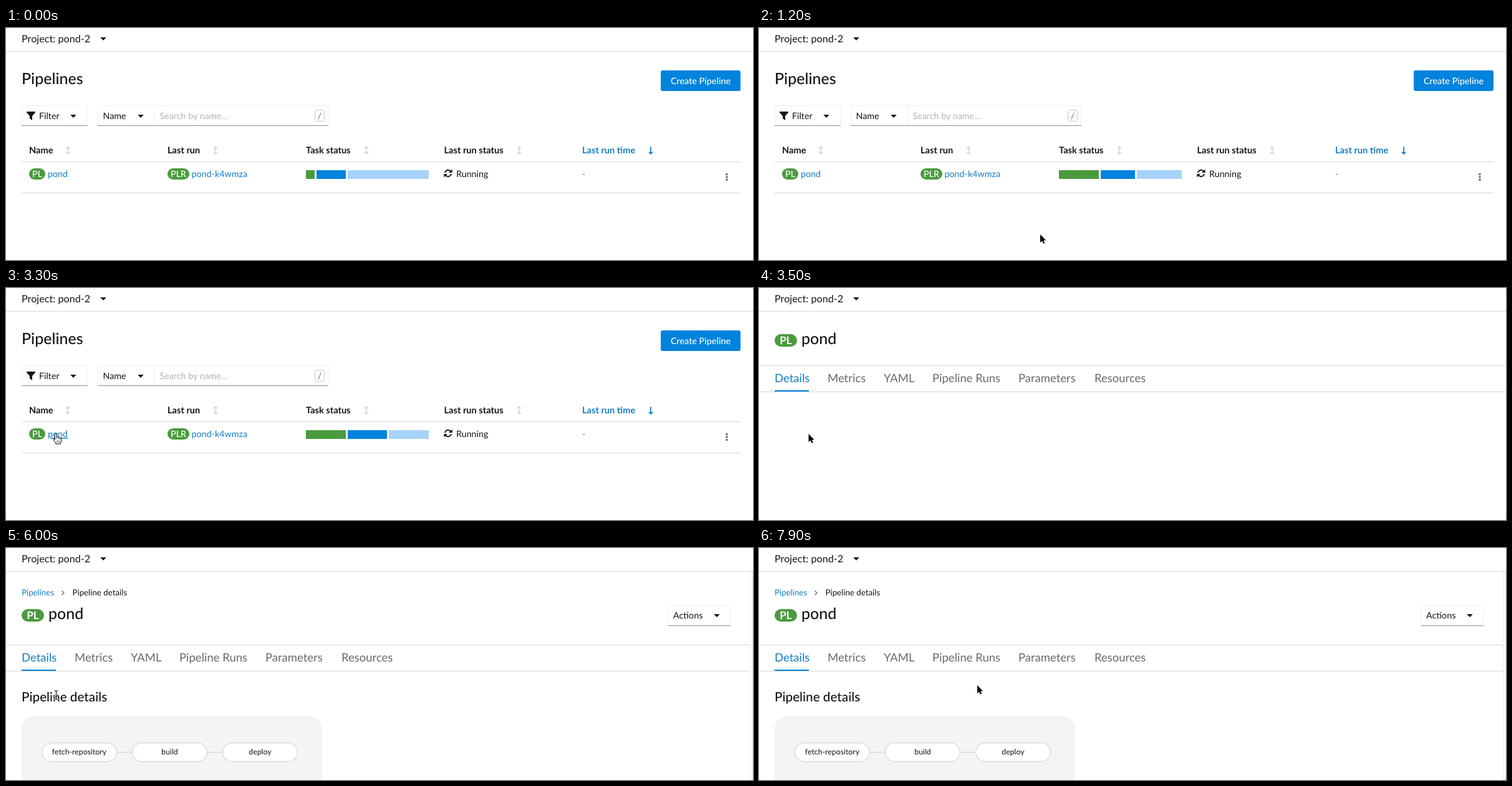
These frames come from a looping animation (1198x372 px, 8 s). An HTML page with a canvas:

```html
<!DOCTYPE html>
<html lang="en">
<head>
<meta charset="utf-8">
<title>Pipelines</title>
<style>
  html, body { margin: 0; width: 100%; height: 100%; overflow: hidden; background: #fff; }
  canvas, svg { position: absolute; left: 0; top: 0; width: 1198px; height: 372px; }
  text { font-family: Lato, "Open Sans", sans-serif; text-rendering: geometricPrecision; white-space: pre; }
</style>
</head>
<body>
<canvas id="shapes" width="1198" height="372"></canvas>
<svg id="overlay" viewBox="0 0 1198 372">
  <g id="labels"></g>
  <g id="cursor" stroke-linejoin="round" stroke-linecap="round">
    <path id="arrow" d="M0 0V13L3 10.2L5 14.8L7.2 13.8L5.2 9.4H9.2Z" fill="#000" stroke="#fff" stroke-width="1.2" paint-order="stroke"/>
    <g id="hand" fill="#fff" stroke="#000" stroke-width="1">
      <path d="M-1.5 1Q-1.5-.5 0-.5Q1.5-.5 1.5 1V5Q4 4.2 4.5 5.6Q6.5 5 7 6.6Q9 6.3 9 8V11Q9 13 7.5 14.5V16H0V14.5L-3.5 10Q-4.5 8-3 7.5Q-2 7.5-1.5 9Z"/>
      <path d="M1.5 5V7.5M4.5 6V8M7 7V8.5M2 11V13.5M4 11V13.5M6 11V13.5" fill="none" stroke-width=".7"/>
    </g>
    <g id="beam" fill="none">
      <path class="stem" stroke="#fff" stroke-width="2.6"/>
      <path class="stem" stroke="#111" stroke-width="1.1"/>
    </g>
  </g>
</svg>
<script>
const LOOP = 8000, STEP = 100;
const INK = '#151515', GREY = '#6a6a6a', LINK = '#147dc2', GREEN = '#4a9b3e',
      BLUE = '#0083dd', PALE = '#a6d3fa', RULE = '#d7d7d7';
const byId = id => document.getElementById(id);
const ctx = byId('shapes').getContext('2d');

// ---------- text ----------
function group(parent = byId('labels')) {
  return parent.appendChild(document.createElementNS('http://www.w3.org/2000/svg', 'g'));
}
function label(parent, str, x, y, size = 14.3, color = INK, weight = 400, anchor = 'start') {
  const el = document.createElementNS('http://www.w3.org/2000/svg', 'text');
  const attrs = { x, y, fill: color, 'font-size': size, 'font-weight': weight, 'text-anchor': anchor };
  for (const key in attrs) el.setAttribute(key, attrs[key]);
  el.textContent = str;
  return parent.appendChild(el);
}

label(group(), 'Project: pond-2', 25, 23, 16.2);

const listText = group();
label(listText, 'Pipelines', 25, 90, 25, INK, 500);
label(listText, 'Create Pipeline', 1114, 90, 14.4, '#fff', 500, 'middle');
label(listText, 'Filter', 53, 146);
label(listText, 'Name', 155.5, 146);
label(listText, 'Search by name...', 246.5, 146, 14.3, '#b4b4b4');
label(listText, '/', 503, 146, 14, GREY, 400, 'middle');
const columns = [['Name', 37, 99], ['Last run', 259, 336], ['Task status', 481, 578],
                 ['Last run status', 702.5, 823], ['Last run time', 924, 1034]];
columns.forEach(([name, x], i) => label(listText, name, x, 201, 14.6, i === 4 ? LINK : INK, 700));
label(listText, 'PL', 50, 239, 14.3, '#fff', 500, 'middle');
const rowLink = label(listText, 'pond', 67, 239, 14.3, LINK);
label(listText, 'PLR', 276.5, 239, 14.3, '#fff', 500, 'middle');
label(listText, 'pond-k4wmza', 297.5, 239, 14.3, LINK);
label(listText, 'Running', 722, 239);
label(listText, '-', 924, 239, 14.3, GREY);

const titleText = group();
label(titleText, 'PL', 43, 90, 17, '#fff', 700, 'middle');
label(titleText, 'pond', 68, 90, 25, INK, 500);
const tabText = group();
[['Details', 25], ['Metrics', 110], ['YAML', 200], ['Pipeline Runs', 278], ['Parameters', 416], ['Resources', 538]]
  .forEach(([name, x], i) => label(tabText, name, x, 151, 18.5, i ? GREY : LINK));

const detailText = group();
label(detailText, 'Pipelines', 25, 76, 13.3, LINK);
label(detailText, 'Pipeline details', 106.5, 76, 13.3);
label(detailText, 'Actions', 1070, 113);
label(detailText, 'Pipeline details', 25, 246, 20.7, INK, 500);
const graphText = group();
const nodes = [['fetch-repository', 57], ['build', 202], ['deploy', 347]];
nodes.forEach(([name, x]) => label(graphText, name, x + 60.5, 331, 12.3, INK, 400, 'middle'));

document.querySelectorAll('.stem').forEach(path => path.setAttribute('d',
  'M-2.5-7Q0-7 0-5V5Q0 7-2.5 7M2.5-7Q0-7 0-5M2.5 7Q0 7 0 5M-1.5 2.5H1.5'));

// ---------- shapes ----------
function rect(x, y, w, h, color) {
  ctx.fillStyle = color;
  ctx.fillRect(x, y, w, h);
}
function round(x, y, w, h, r, fill, stroke) {
  ctx.beginPath();
  ctx.roundRect(x, y, w, h, r);
  if (fill) { ctx.fillStyle = fill; ctx.fill(); }
  if (stroke) { ctx.strokeStyle = stroke; ctx.lineWidth = 1; ctx.stroke(); }
}
function poly(color, ...points) {
  ctx.beginPath();
  points.forEach(([x, y]) => ctx.lineTo(x, y));
  ctx.fillStyle = color;
  ctx.fill();
}
function line(color, width, ...points) {
  ctx.beginPath();
  points.forEach(([x, y]) => ctx.lineTo(x, y));
  ctx.strokeStyle = color;
  ctx.lineWidth = width;
  ctx.stroke();
}
const caret = (x, y) => poly(INK, [x - 4.8, y - 2.4], [x + 4.8, y - 2.4], [x, y + 2.6]);

function field(x, y, w) {
  round(x + .5, y + .5, w - 1, 32, 0, null, '#efefef');
  rect(x, y + 32, w, 1, '#8a8d90');
}
function sortArrow(x, active) {
  const color = active ? LINK : '#d2d2d2', width = active ? 1.8 : 1.4;
  line(color, width, [x, 190.5], [x, 201.5]);
  line(color, width, [x - 3, 198.8], [x, 201.8], [x + 3, 198.8]);
  if (!active) line(color, width, [x - 3, 193.2], [x, 190.2], [x + 3, 193.2]);
}
function syncIcon(x, y) {
  ctx.save();
  ctx.translate(x, y);
  for (let i = 0; i < 2; i++) {
    ctx.beginPath();
    ctx.arc(0, 0, 5.2, Math.PI * 1.06, Math.PI * 1.8);
    ctx.strokeStyle = INK;
    ctx.lineWidth = 1.9;
    ctx.stroke();
    poly(INK, [6.6, -6.6], [6.6, -1], [1, -1]);
    ctx.rotate(Math.PI);
  }
  ctx.restore();
}

const growth = t => Math.min(1, .22 + .0032 * t);

function taskBar(t) {
  const bar = (from, to, color) => to > from && rect(from, 228, to - from, 14, color);
  const greenEnd = Math.round(481 + 64 * growth(t));
  bar(481, greenEnd, GREEN);
  bar(greenEnd + 3, 545, BLUE);
  if (t < 1000) return bar(548, 678, PALE);
  const blueEnd = Math.round(548 + 63.4 * growth(t - 1000));
  bar(548, blueEnd, BLUE);
  bar(blueEnd + 3, 678, PALE);
}

function drawList(t) {
  round(1050, 68, 128, 33, 3, BLUE);
  field(25, 124, 106);
  field(147, 124, 370);
  rect(238, 125, 1, 31, '#efefef');
  poly(INK, [33, 134], [47, 134], [47, 135.5], [42, 141], [42, 148], [38, 145], [38, 141], [33, 135.5]);
  caret(108, 141.5);
  caret(216, 141.5);
  round(495.5, 131.5, 15, 18, 3, null, '#c6c6c6');
  columns.forEach(([, , x], i) => sortArrow(x, i === 4));
  rect(25, 214, 1153, 1, RULE);
  rect(25, 264, 1153, 1, RULE);
  round(37, 225, 26, 18, 9, GREEN);
  round(259, 225, 35, 18, 9, GREEN);
  taskBar(t);
  syncIcon(709, 233);
  for (const y of [234.5, 239, 243.5]) round(1154.2, y - 1.8, 3.6, 3.6, 1.8, GREY);
}

function drawDetails(loaded, graph) {
  const titleShift = loaded ? 24 : 0, tabShift = loaded ? 31 : 0, width = loaded ? 1193 : 1198;
  titleText.setAttribute('transform', `translate(0 ${titleShift})`);
  tabText.setAttribute('transform', `translate(0 ${tabShift})`);
  round(25, 74 + titleShift, 36, 20, 10, GREEN);
  rect(0, 124 + tabShift, width, 1, RULE);
  rect(0, 166 + tabShift, width, 1, RULE);
  rect(25, 164 + tabShift, 55, 2, BLUE);
  if (!loaded) return;
  line(GREY, 1.3, [89.5, 68.5], [93, 72], [89.5, 75.5]);
  field(1062, 92, 100);
  caret(1140, 108.5);
  rect(1193, 38, 1, 334, '#ececec');
  rect(1197, 38, 1, 334, '#dcdcdc');
  if (!graph) return;
  round(25, 270, 482, 130, 20, '#f4f4f4');
  rect(178, 327, 169, 1, '#cfcfcf');
  nodes.forEach(([, x]) => round(x + .5, 312.5, 120, 30, 15, '#fff', '#cbcbcb'));
}

// ---------- pointer ----------
const track = [
  [300, 468, 339], [400, 456, 334], [500, 452, 332], [700, 450, 331], [800, 451, 331],
  [1400, 451, 331], [1600, 425, 322], [2000, 250, 278], [2300, 150, 252], [2600, 98, 240],
  [2800, 84, 236], [3200, 80, 234], [3500, 79.5, 234], [4900, 79.5, 234], [5000, 80, 235],
  [5900, 80, 235], [6000, 80.5, 235.7], [6600, 80.5, 235.7], [6800, 96, 238], [7000, 150, 239],
  [7300, 270, 234], [7500, 319, 228], [7700, 342, 222], [7900, 350, 220]
];
function pointerAt(t) {
  const i = track.findIndex(point => point[0] > t);
  if (i < 1) return track[i ? track.length - 1 : 0].slice(1);
  const [t0, x0, y0] = track[i - 1], [t1, x1, y1] = track[i];
  const k = (t - t0) / (t1 - t0);
  return [x0 + (x1 - x0) * k, y0 + (y1 - y0) * k];
}
function pointerKind(t) {
  if (t < 300) return '';
  if (t >= 2700 && t < 3500) return 'hand';
  if (t >= 3800 && t < 7100) return 'beam';
  return 'arrow';
}

const show = (el, on) => { el.style.display = on ? '' : 'none'; };

function render(t) {
  const list = t < 3500, loaded = t >= 3700, graph = t >= 3800, kind = pointerKind(t);
  rect(0, 0, 1198, 372, '#fff');
  caret(156, 17.5);
  rect(0, 37, 1198, 1, RULE);
  if (list) drawList(t); else drawDetails(loaded, graph);
  for (const x of [0, 1197]) for (const y of [0, 371]) rect(x, y, 1, 1, '#b5b5b5');

  show(listText, list);
  show(titleText, !list);
  show(tabText, !list);
  show(detailText, loaded);
  show(graphText, graph);
  rowLink.setAttribute('text-decoration', kind === 'hand' ? 'underline' : 'none');

  for (const id of ['arrow', 'hand', 'beam']) show(byId(id), id === kind);
  byId('cursor').setAttribute('transform', `translate(${pointerAt(t).join(' ')})`);
}

function tick() {
  const t = performance.now() % LOOP;
  render(Math.floor(t / STEP) * STEP);
  requestAnimationFrame(tick);
}
tick();
</script>
</body>
</html>
```
